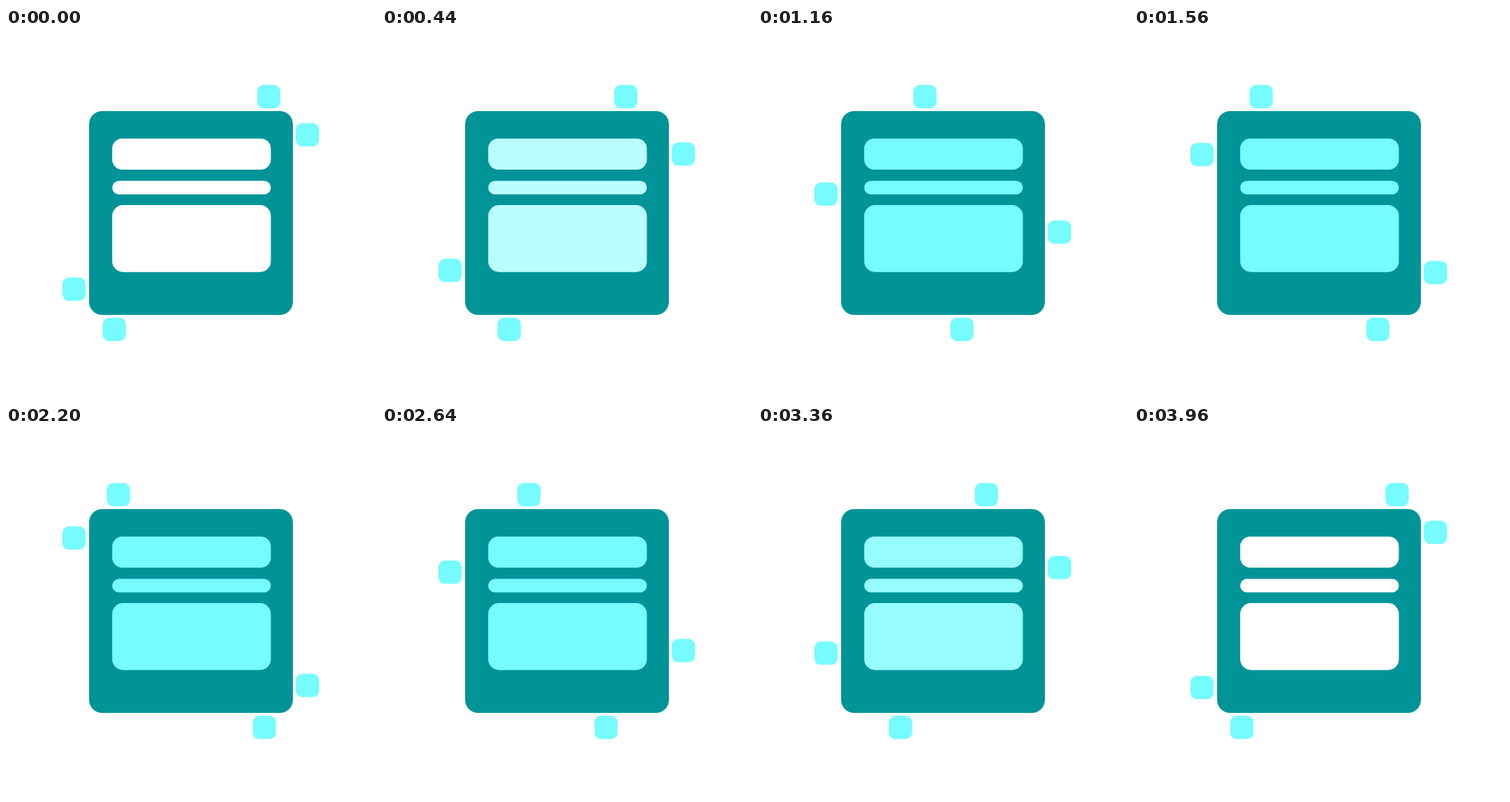
An HTML page for the animation above (4 s loop, 512 px wide and 512 px high).

```html
<!DOCTYPE html>
<html lang="en">
<head>
<meta charset="utf-8">
<title>Card with orbiting tiles</title>
<style>
  html, body { margin: 0; width: 100%; height: 100%; overflow: hidden; background: #fff; }
  svg { display: block; width: 100%; height: 100%; }
  .card { fill: #009499; }
  .tile { fill: #76fbff; }
  .bar { fill: #fff; }
</style>
</head>
<body>
<svg viewBox="0 0 512 512">
  <rect class="card" x="115" y="115" width="282" height="282" rx="18"/>
  <rect class="bar" x="147" y="153" width="219.5" height="43" rx="14"/>
  <rect class="bar" x="147" y="211.5" width="219.5" height="18.7" rx="9.3"/>
  <rect class="bar" x="147" y="245" width="219.5" height="92.7" rx="15"/>
</svg>
<script>
  const LOOP = 4000;
  const EASE = 'cubic-bezier(.333, 0, .667, 1)';
  const svg = document.querySelector('svg');

  // steps: [time in ms, style] pairs, eased one to the next
  function loop(element, steps) {
    const frames = steps.map(([time, style]) => ({ offset: time / LOOP, easing: EASE, ...style }));
    element.animate(frames, { duration: LOOP, iterations: Infinity }).startTime = 0;
    element.getAnimations()[0].startTime = document.timeline.currentTime;
  }

  function addTile(x, y, dx, dy) {
    const tile = document.createElementNS(svg.namespaceURI, 'rect');
    const attributes = { class: 'tile', x, y, width: 32.3, height: 32.3, rx: 9 };
    for (const [name, value] of Object.entries(attributes)) tile.setAttribute(name, value);
    svg.append(tile);
    const home = { transform: 'translate(0px, 0px)' };
    const away = { transform: `translate(${dx}px, ${dy}px)` };
    loop(tile, [[0, home], [2000, away], [3960, home], [LOOP, home]]);
  }

  addTile(347.9, 78.8, -214.7, 0);
  addTile(401, 131, 0, 218.3);
  addTile(133.1, 400.9, 214.7, 0);
  addTile(78, 345.8, 0, -213.2);

  const white = { fill: '#ffffff' };
  const cyan = { fill: '#76fbff' };
  for (const bar of document.querySelectorAll('.bar')) {
    loop(bar, [[0, white], [880, cyan], [3080, cyan], [3960, white], [LOOP, white]]);
  }
</script>
</body>
</html>
```
